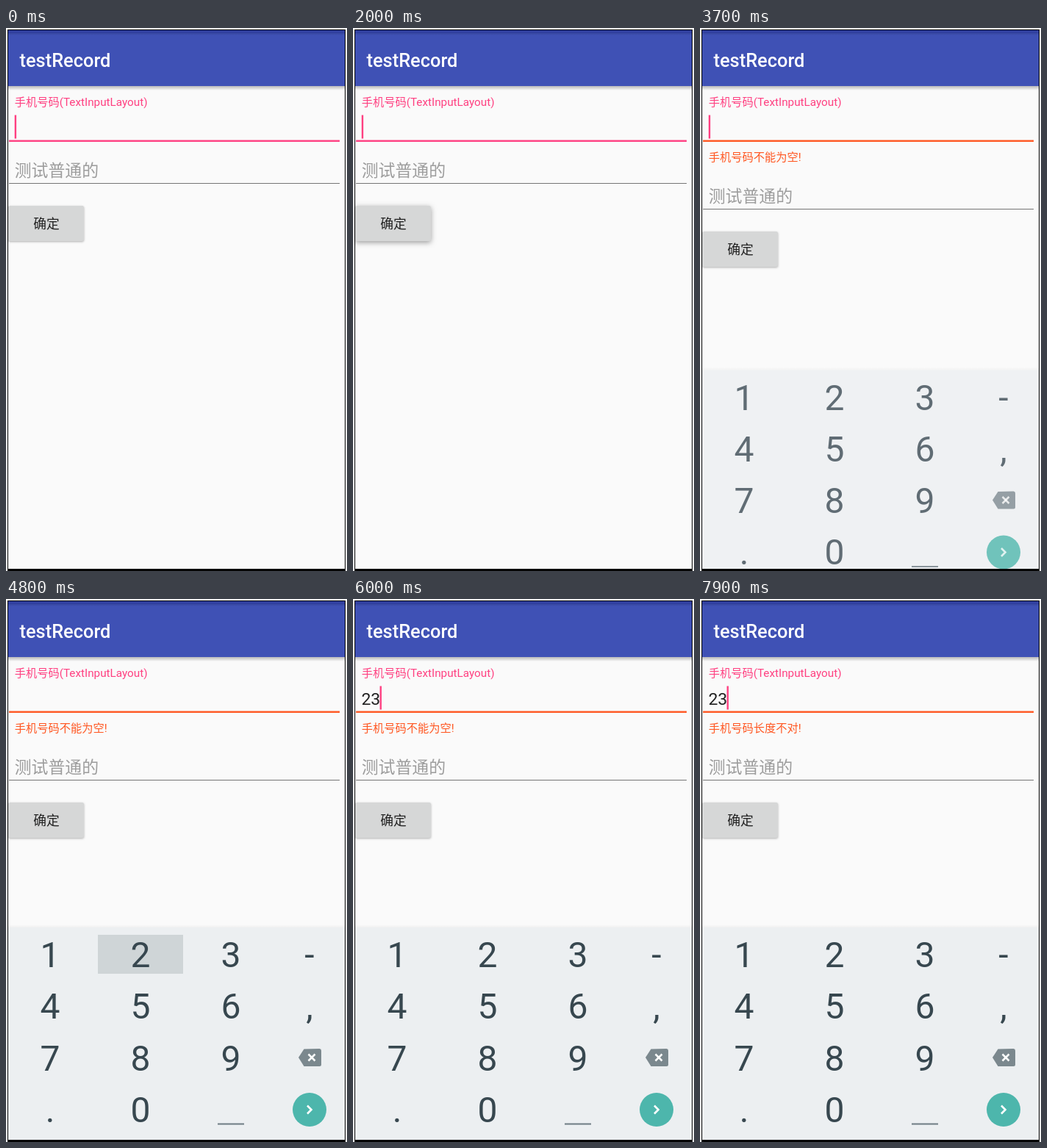
These frames come from a looping animation (464x739 px, 8 s). An HTML page with a canvas:

```html
<!DOCTYPE html>
<html lang="zh-CN">
<head>
<meta charset="utf-8">
<style>
html, body { margin: 0; height: 100%; overflow: hidden; background: #fff; }
canvas { display: block; }
</style>
</head>
<body>
<canvas id="stage" width="464" height="739"></canvas>
<script>
const c = document.getElementById('stage').getContext('2d');
const LOOP = 8000, STEP = 100;
const BLINKS = [200, 700, 1100, 1600, 2100, 2500, 3000, 3400, 3900, 4300, 4800, 4900,
  5300, 5700, 6400, 6800, 7300, 7900];
const PINK = '#ff4081', ORANGE = '#ff5722', INK = '#37474f';
const COLS = [60, 183, 306, 413];
const KEYS = ['123-', '456,', '789', '.0'];

// Value of the last [time, value] pair reached at t
const at = (t, pairs) => pairs.reduce((v, [time, value]) => t >= time ? value : v, pairs[0][1]);

function rect(x, y, w, h, color) {
  c.fillStyle = color;
  c.fillRect(x, y, w, h);
}

function text(s, x, y, size, color, weight = 400, align = 'left') {
  c.font = `${weight} ${size}px Roboto, "Noto Sans CJK SC", "Noto Sans CJK", sans-serif`;
  c.textAlign = align;
  c.fillStyle = color;
  c.fillText(s, x, y);
}

function stroke(points, color, width) {
  c.beginPath();
  points.forEach(([x, y], i) => i ? c.lineTo(x, y) : c.moveTo(x, y));
  c.strokeStyle = color;
  c.lineWidth = width;
  c.stroke();
}

function fade(y, h, alpha) {
  const g = c.createLinearGradient(0, y, 0, y + h);
  g.addColorStop(0, `rgba(0,0,0,${alpha})`);
  g.addColorStop(1, 'rgba(0,0,0,0)');
  rect(3, y, 458, h, g);
}

function toolbar() {
  rect(3, 3, 458, 76, '#3f51b5');
  rect(3, 3, 458, 4, '#303f9f');
  fade(7, 3, 0.12);
  fade(79, 6, 0.26);
  text('testRecord', 18.5, 53, 25.4, '#fff', 500);
}

function button(y, lift) {
  c.save();
  c.shadowColor = `rgba(0,0,0,${0.3 + 0.08 * lift})`;
  c.shadowBlur = 3 + 4 * lift;
  c.shadowOffsetY = 1 + lift;
  c.fillStyle = '#d6d7d7';
  c.beginPath();
  c.roundRect(3, y, 103, 48, 2.5);
  c.fill();
  c.restore();
  text('确定', 37.3, y + 30.5, 17.8, '#212121');
}

function form(t) {
  const failed = t >= 2100, shift = failed ? 35 : 0;
  const typed = at(t, [[0, ''], [4900, '2'], [6000, '23']]);
  text('手机号码(TextInputLayout)', 11.7, 106, 15.27, PINK);
  text(typed, 11.5, 144, 22.9, '#212121');
  if (BLINKS.filter(b => b <= t).length % 2 === 0)
    rect(11.7 + 12.4 * typed.length, 118.5, 2.4, 32, PINK);
  rect(4, 152.5, 450, 2.4, failed ? ORANGE : PINK);

  c.globalAlpha = at(t, [[0, 0], [2100, 0.3], [2200, 0.8], [2300, 1], [7400, 0.4], [7500, 1]]);
  text(t < 7400 ? '手机号码不能为空!' : '手机号码长度不对!', 11.7, 180.5, 15.27, ORANGE);
  c.globalAlpha = 1;

  text('测试普通的', 11.7, 201.5 + shift, 22.9, '#9d9d9d');
  rect(4, 211 + shift, 450, 1, '#757575');
  button(242 + shift, at(t, [[0, 0], [1900, 0.5], [2000, 1], [2200, 0.5], [2300, 0],
    [7200, 0.5], [7300, 1], [7400, 0.6], [7500, 0]]));
}

function backspace() {
  c.fillStyle = '#7b888e';
  c.beginPath();
  c.moveTo(398, 624);
  c.lineTo(405.5, 612.5);
  c.arcTo(429, 612, 429, 636, 2.5);
  c.arcTo(429, 636, 405, 636, 2.5);
  c.lineTo(405.5, 636);
  c.fill();
  stroke([[411.5, 619.5], [420.5, 628.5]], '#fff', 2.5);
  stroke([[420.5, 619.5], [411.5, 628.5]], '#fff', 2.5);
}

function keyboard(t) {
  if (t < 3700) return;
  c.save();
  c.globalAlpha = at(t, [[3700, 0.78], [3800, 0.96], [3900, 1]]);
  c.translate(0, at(t, [[3700, 18.5], [3800, 3], [3900, 0]]));
  fade(447, -4, 0.04);
  rect(3, 447, 458, 292, '#eceff1');
  const pressed = t === 4800 ? 1 : t === 5900 ? 2 : 0;
  if (pressed) rect(COLS[pressed] - 58, 457, 116, 53, '#cfd5d7');
  KEYS.forEach((row, r) => [...row].forEach((key, i) =>
    text(key, COLS[i], 501 + 70.3 * r, 48, INK, 400, 'center')));
  rect(288, 713.5, 36, 2, '#6f7c83');
  backspace();
  c.fillStyle = '#4db6ac';
  c.beginPath();
  c.arc(413, 695, 23, 0, 7);
  c.fill();
  stroke([[410, 689.5], [415.5, 695], [410, 700.5]], '#fff', 2.6);
  c.restore();
}

function frame() {
  rect(2, 2, 460, 1, '#000');
  rect(2, 2, 1, 737, '#000');
  rect(461, 2, 1, 737, '#000');
  rect(2, 736, 460, 3, '#000');
}

function draw(now) {
  const t = Math.floor(now % LOOP / STEP) * STEP;
  rect(0, 0, 464, 739, '#fff');
  rect(3, 3, 458, 734, '#fafafa');
  form(t);
  toolbar();
  keyboard(t);
  frame();
  requestAnimationFrame(draw);
}
requestAnimationFrame(draw);
</script>
</body>
</html>
```
